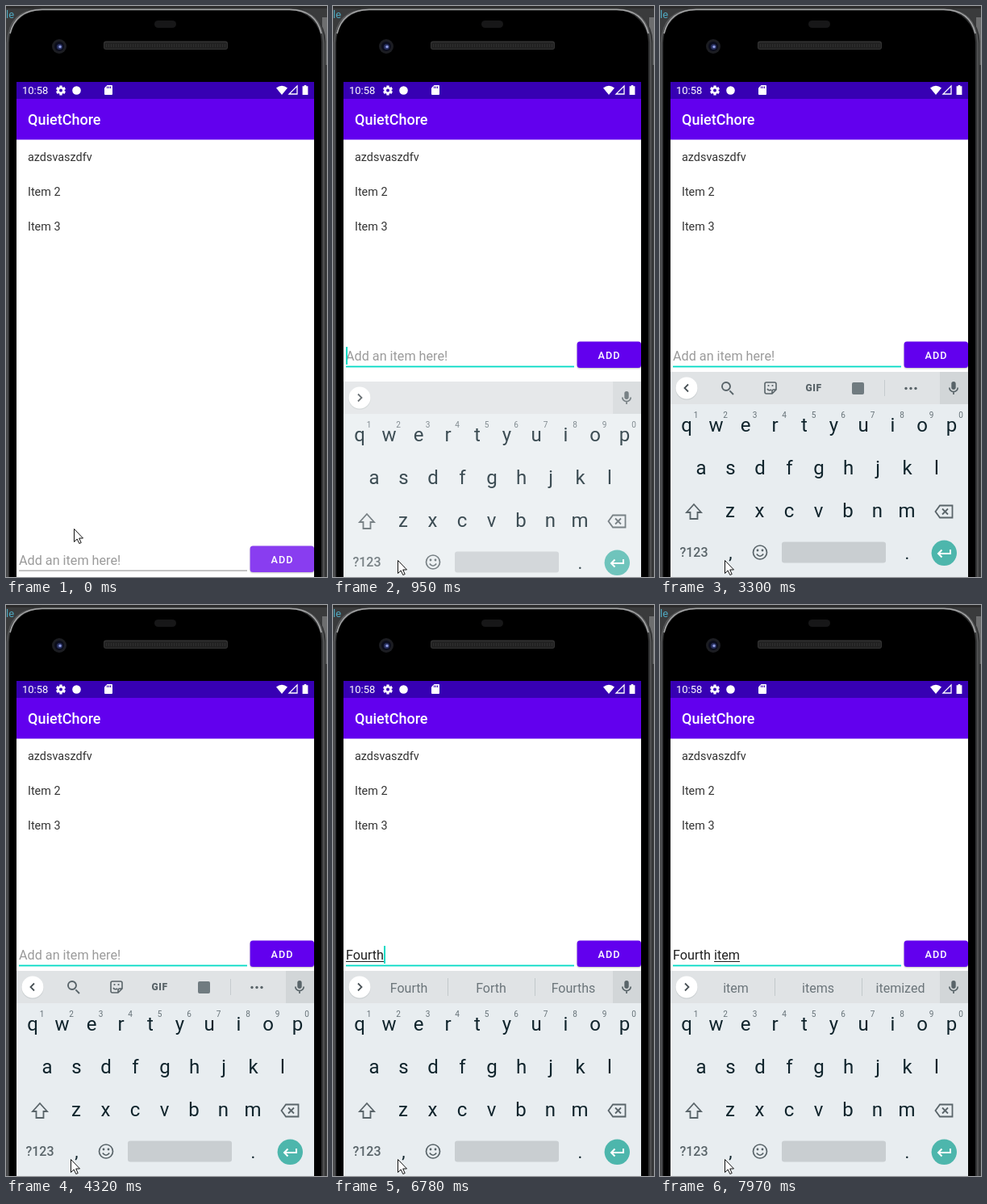
An HTML page with a canvas that plays this animation: 398 by 707 pixels, repeating every 8 s.

```html
<!DOCTYPE html>
<html lang="en">
<head>
<meta charset="utf-8">
<title>Todo list</title>
<style>
html, body { margin: 0; width: 100%; height: 100%; overflow: hidden; background: #000; }
canvas { display: block; }
</style>
</head>
<body>
<canvas id="stage" width="398" height="707"></canvas>
<script>
const ctx = document.getElementById('stage').getContext('2d');
const LOOP = 8000;
const ICON = '#596469';
const TEAL = '#03dac5';

// Each row holds from its time on.
const POINTER = [[0, 84, 647], [130, 82, 662], [250, 80, 676], [400, 80, 686]];
const KEYBOARD = [[820, 40, 0.3], [950, 12, 0.81], [1100, 0, 1]];
const BLINKS = [1250, 1820, 2270, 2700, 3300, 3750, 4320, 4780, 5210, 5770, 7970];
const TYPING = [
  [6070, '', 'F', ['F', 'For', 'First']],
  [6200, '', 'Fo', ['Fo', 'For', 'Forever']],
  [6500, '', 'Four', ['Four', 'Fourth', 'Fours']],
  [6780, '', 'Fourth', ['Fourth', 'Forth', 'Fourths']],
  [6930, 'Fourth ', '', ['of', 'and', 'is']],
  [7240, 'Fourth ', 'it', ['it', 'its', 'is']],
  [7390, 'Fourth ', 'ite', ['ite', 'item', 'it']],
  [7540, 'Fourth ', 'item', ['item', 'items', 'itemized']]
];

const at = (rows, t) => rows.filter(row => row[0] <= t).pop();

function rect(x, y, w, h, color) {
  ctx.fillStyle = color;
  ctx.fillRect(x, y, w, h);
}

function round(x, y, w, h, r, color) {
  ctx.fillStyle = color;
  ctx.beginPath();
  ctx.roundRect(x, y, w, h, r);
  ctx.fill();
}

function disc(x, y, r, color) {
  ctx.fillStyle = color;
  ctx.beginPath();
  ctx.arc(x, y, r, 0, Math.PI * 2);
  ctx.fill();
}

function text(str, x, y, size, color, align = 'left', weight = 400, spacing = 0) {
  ctx.font = `${weight} ${size}px Roboto, sans-serif`;
  ctx.letterSpacing = spacing + 'px';
  ctx.textAlign = align;
  ctx.fillStyle = color;
  ctx.fillText(str, x, y);
  return ctx.measureText(str).width;
}

// Draws an SVG path around (x, y): stroked when a width is given, else filled.
function icon(d, x, y, color, width) {
  const path = new Path2D(d);
  ctx.save();
  ctx.translate(x, y);
  if (width) {
    ctx.strokeStyle = color;
    ctx.lineWidth = width;
    ctx.stroke(path);
  } else {
    ctx.fillStyle = color;
    ctx.fill(path);
  }
  ctx.restore();
}

function gear(x, y) {
  ctx.save();
  ctx.translate(x, y);
  for (let i = 0; i < 3; i++) {
    rect(-1.6, -6, 3.2, 12, '#fff');
    ctx.rotate(Math.PI / 3);
  }
  ctx.restore();
  disc(x, y, 4.6, '#fff');
  disc(x, y, 2, '#3700b3');
}

function drawPhone() {
  rect(0, 0, 398, 707, '#3a3b3c');
  rect(0, 0, 398, 3, '#2b2b2b');
  text('le', 0, 15, 13, '#4fa8c0');
  rect(392, 14, 6, 59, '#6d6e6f');
  round(0.5, 2, 396, 800, 42, '#333435');
  round(4, 5, 387, 800, 40, '#000');
  icon('M1.5 707V46Q3 4 45 4H352Q392 4 394 46V707', 0, 0, '#58595a', 1.6);
  icon('M5 34Q12 5 45 4.5H352Q384 5 391 34', 0, 0, '#a5a6a7', 1.6);

  round(184, 18, 27, 9, 4.5, '#171718');
  disc(66, 50, 9, '#1c1d22');
  disc(66, 50, 6, '#0b0d1c');
  disc(66.5, 50.5, 3.5, '#28305f');
  disc(67, 50.5, 1.7, '#8f9be0');
  round(121, 43.5, 154, 10.5, 3, '#333');
  round(122, 45, 152, 8, 2, '#222');
  for (let x = 124; x < 273; x += 3) rect(x, 47, 1, 4, '#2e2e2e');
}

function drawAppBar() {
  rect(13, 94, 369, 613, '#fff');
  rect(13, 94, 369, 21, '#3700b3');
  rect(13, 115, 369, 50.5, '#6200ee');
  text('10:58', 20, 109, 13, '#fff');
  gear(68, 104.5);
  disc(87.5, 104.5, 5.3, '#fff');
  icon('M-1.5-6H4Q5-6 5-5V5Q5 6 4 6H-4Q-5 6-5 5V-2.5Z', 127, 104, '#fff');
  for (let i = 0; i < 3; i++) rect(125 + i * 2, 99.5, 1, 2.5, '#3700b3');
  icon('M0 6L-7-2.5Q0-8 7-2.5Z', 342, 104, '#fff');
  icon('M-5 5H5V-5Z', 356, 104, '#fff', 1.3);
  icon('M-1.3-6H1.3V-4.8H3.4V6H-3.4V-4.8H-1.3Z', 371, 104, '#fff');
  text('QuietChore', 27, 147, 18, '#fff', 'left', 500);
  ['azdsvaszdfv', 'Item 2', 'Item 3'].forEach((item, i) =>
    text(item, 27, 192 + i * 43, 14.4, '#333'));
}

function drawForm(t, entry) {
  const open = t >= 820;
  const y = open ? 416 : 669;
  let caretX = 16;
  if (entry) {
    const [, done, word] = entry;
    const start = 16 + text(done, 16, y + 23, 16.2, '#202020');
    const width = text(word, start, y + 23, 16.2, '#202020');
    rect(start, y + 25, width, 1, '#202020');
    caretX = Math.round(start + width);
  } else {
    text('Add an item here!', 16, y + 23, 16.2, '#9b9b9b');
  }
  rect(16, y + 29.6, 283, open ? 1.8 : 1, open ? TEAL : '#8b8b8b');
  const blinks = BLINKS.filter(time => time <= t).length;
  if (open && blinks % 2 === 0) rect(caretX, 422, 2, 22, TEAL);

  ctx.save();
  ctx.shadowColor = 'rgba(0,0,0,.25)';
  ctx.shadowBlur = 2;
  ctx.shadowOffsetY = 1;
  round(302.6, y - 0.4, 79.4, 32.4, 3.5, open ? '#6200ee' : '#893df0');
  ctx.restore();
  text('ADD', 342.5, y + 21, 12.6, '#fff', 'center', 500, 1.1);
}

function drawTools() {
  icon('M3.4 3.4L8 8M4-2A5 5 0 1 1-6-2A5 5 0 1 1 4-2', 83, 473, ICON, 1.9);
  icon('M-5-7H5Q7-7 7-5V2L2 7H-5Q-7 7-7 5V-5Q-7-7-5-7ZM7 2H4Q2 2 2 4V7M-4 1Q-2 4 1 2', 137, 473, ICON, 1.6);
  disc(134.5, 470, 1.1, ICON);
  disc(139.5, 470, 1.1, ICON);
  text('GIF', 190.5, 477, 12, ICON, 'center', 900, 0.6);
  round(238, 466, 15, 15, 2, '#707b80');
  rect(278, 463, 1, 20, '#c5cbce');
  for (const x of [305, 311, 317]) disc(x, 473.5, 1.7, ICON);
}

function drawStrip(t, entry) {
  const tools = t >= 1100 && !entry;
  rect(13, 453, 369, 40, '#e0e3e5');
  rect(347, 453, 35, 40, '#d2d6d8');
  disc(33, 474, 13.8, '#ccd1d3');
  disc(33, 473, 13.5, '#fff');
  icon(tools ? 'M2-4.5L-2.5 0L2 4.5' : 'M-2-4.5L2.5 0L-2 4.5', 33, 473, '#485156', 1.8);
  if (tools) drawTools();
  if (entry) {
    entry[3].forEach((word, i) => text(word, 94 + i * 102, 479.5, 16, '#6b757a', 'center'));
    rect(142, 462, 1, 22, '#c2c8cb');
    rect(250, 462, 1, 22, '#c2c8cb');
  }
  round(361.3, 465, 5.4, 10, 2.7, ICON);
  icon('M-5.2-.5A5.2 5.2 0 0 0 5.2-.5M0 4.7V8', 364, 473, ICON, 1.7);
}

function drawKeys() {
  const pitch = 36.5;
  ['qwertyuiop', 'asdfghjkl', 'zxcvbnm'].forEach((row, r) => {
    [...row].forEach((key, i) => {
      const x = [33, 51, 87][r] + i * pitch;
      text(key, x, 527 + r * 53, 24, '#10242c', 'center');
      if (r === 0) text((i + 1) % 10, x + 11.5, 509.5, 10, '#657177', 'center');
    });
  });
  icon('M0-9L-9 1H-4.5V9H4.5V1H9Z', 42, 626, ICON, 1.8);
  icon('M-5-7.5H10.5V7.5H-5L-10.5 0ZM-2-3.5L5 3.5M5-3.5L-2 3.5', 352, 626, ICON, 1.8);
  text('?123', 42, 682, 16, ICON, 'center', 500);
  text(',', 87.5, 684, 22, '#10242c', 'center');
  text('.', 306.5, 685, 22, '#10242c', 'center');
  icon('M8.5 0A8.5 8.5 0 1 1-8.5 0A8.5 8.5 0 1 1 8.5 0M-4.2 2Q0 7.5 4.2 2', 124, 676.5, ICON, 1.7);
  disc(121, 674, 1.4, ICON);
  disc(127, 674, 1.4, ICON);
  round(151, 663.5, 129, 26, 3, '#c9ced1');
  disc(352.3, 677.3, 15.7, '#4db6ac');
  icon('M8-5V0H-7M-2.5-4.5L-7 0L-2.5 4.5', 352, 678, '#fff', 2);
}

function drawKeyboard(t, entry) {
  const state = at(KEYBOARD, t);
  if (!state) return;
  const [, drop, alpha] = state;
  ctx.save();
  ctx.beginPath();
  ctx.rect(13, 453, 369, 254);
  ctx.clip();
  ctx.translate(0, drop);
  rect(13, 453, 369, 254, '#e8edf0');
  drawStrip(t, entry);
  drawKeys();
  ctx.restore();
  // Veil the panel with the white page behind it while it fades in.
  if (alpha < 1) rect(13, 453, 369, 254, `rgba(255,255,255,${1 - alpha})`);
}

function drawPointer(t) {
  const [, x, y] = at(POINTER, t);
  const shape = 'M.5.5V16.5L4.2 13L6.8 18.5L9.2 17.5L6.7 12H11.5Z';
  icon(shape, x, y, '#fff');
  icon(shape, x, y, '#111', 1);
}

function draw(t) {
  const entry = at(TYPING, t);
  drawPhone();
  drawAppBar();
  drawForm(t, entry);
  drawKeyboard(t, entry);
  drawPointer(t);
}

let start;
function tick(now) {
  start ??= now;
  draw((now - start) % LOOP);
  requestAnimationFrame(tick);
}
draw(0);
requestAnimationFrame(tick);
</script>
</body>
</html>
```
